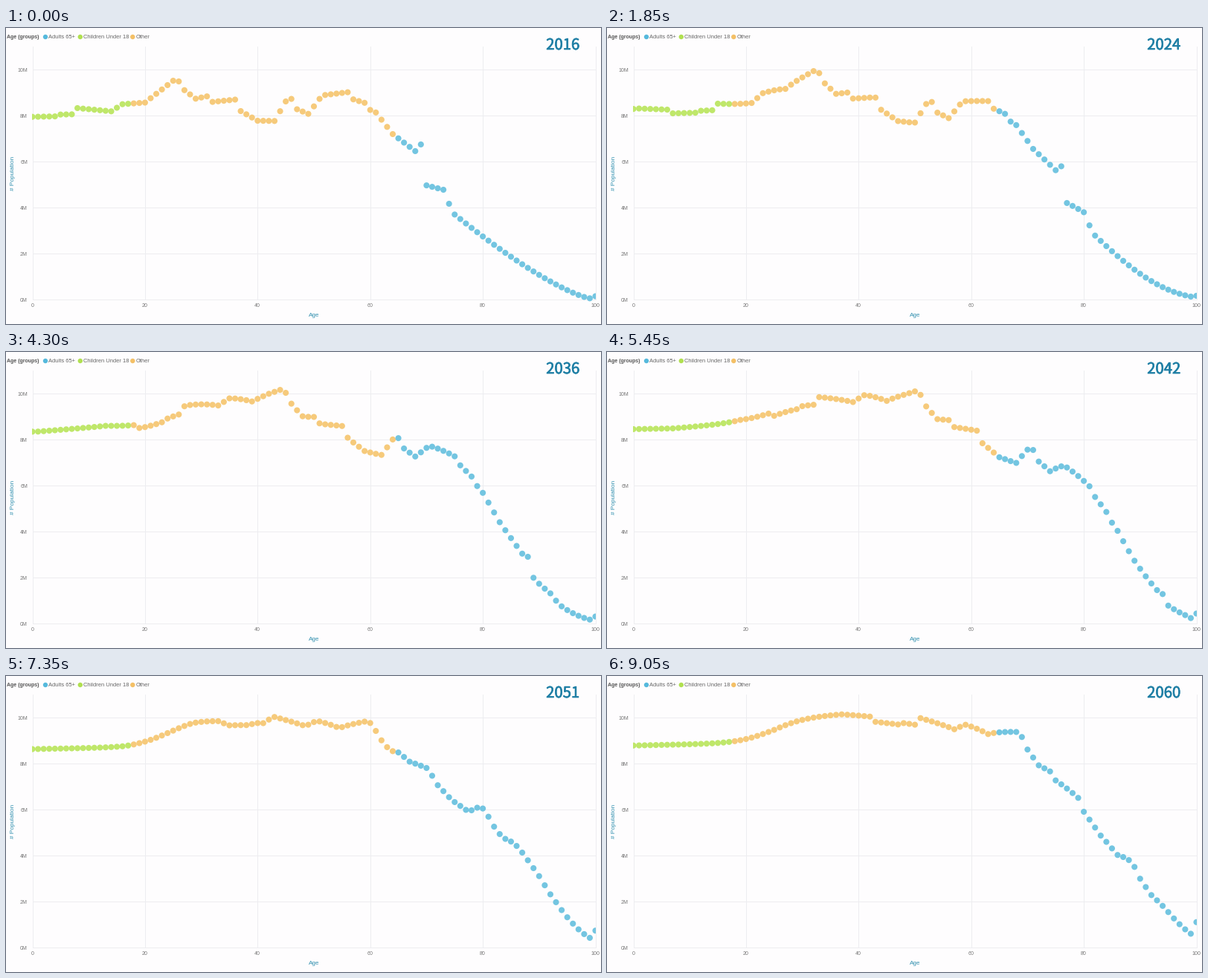
Animation of 800 by 399 pixels, one loop 9.1 s. Source, as a matplotlib script:

```python
import numpy as np
import matplotlib.pyplot as plt
from matplotlib.animation import FuncAnimation
from matplotlib.patches import Circle, Rectangle
from matplotlib.patheffects import withStroke

W, H, DPI = 800, 399, 100
STEP_MS, FRAMES = 50, 182
FIRST_MS, YEAR_MS = 450, 200      # start of the first move, time per year
START_YEAR = 2016

LEFT, RIGHT, TOP, BASE = 35.5, 793, 25, 366.2
PX_PER_AGE, PX_PER_M = 7.57, 31
BLUE, GREEN, ORANGE = "#73c5e1", "#bfe76a", "#f6ca7b"
TEAL, GREY, GRID = "#2f8fae", "#777777", "#ededf0"

# Turning points of the first year's curve: (age, millions)
TURNS = [(0, 7.95), (4, 7.97), (5, 8.05), (7, 8.06), (8, 8.33), (14, 8.19),
         (16, 8.5), (20, 8.57), (25, 9.52), (26, 9.49), (27, 9.11), (29, 8.74),
         (31, 8.84), (32, 8.6), (36, 8.7), (37, 8.2), (40, 7.78), (43, 7.77),
         (45, 8.62), (46, 8.73), (47, 8.28), (49, 8.08), (51, 8.73), (52, 8.9),
         (56, 9.02), (57, 8.71), (59, 8.56), (60, 8.25), (61, 8.14), (64, 7.2),
         (68, 6.46), (69, 6.75), (70, 4.97), (73, 4.78), (74, 4.17)]
BIRTHS = [(1, 8.13), (6, 8.29), (18, 8.33), (43, 8.79)]

AGES = np.arange(101)


def through(x, points):
    return np.interp(x, *zip(*points))


def first_year(age):
    tail = .06 + .0585 * np.maximum(99 - age, 0) ** 1.3
    return np.where(age < 75, through(age, TURNS), tail)


def arrivals(age, n):
    """Growth of a birth cohort by migration, mostly in its twenties."""
    mid = 24.5 - 1.7 * np.exp(-n / 5)
    return 1 + .0027 * np.minimum(age, 42) + .13 / (1 + np.exp((mid - age) / 3))


def deaths(age, n):
    """Summed mortality: Gompertz law plus a midlife part, both easing with time."""
    late = 1.12 * np.exp(.108 * (age - 88.5))
    midlife = .0013 * np.clip(age - 50, 0, 22)
    return late * (1 - .005 * n) + midlife * (1 - .03 * n)


def population(n):
    """Millions by age, n years after the start."""
    born = AGES - n
    since = np.maximum(born, 0)
    people = np.where(born >= 0, first_year(since), through(-born, BIRTHS))
    people = people * arrivals(AGES, n) / arrivals(since, 0)
    people *= np.exp(deaths(since, n) - deaths(AGES, n))
    people[100] = .15 + .96 * (n / 43) ** 2.2      # everyone of 100 or more
    return people


def ease(u):
    return 4 * u ** 3 if u < .5 else 1 - 4 * (1 - u) ** 3


def state(ms):
    """Year shown and the population at a time."""
    if ms < FIRST_MS:
        return START_YEAR, population(0)
    done, rest = divmod(ms - FIRST_MS, YEAR_MS)
    u = ease(rest / YEAR_MS)
    people = (1 - u) * population(done) + u * population(done + 1)
    return START_YEAR + done + 1, people


fig = plt.figure(figsize=(W / DPI, H / DPI), dpi=DPI, facecolor="#fefdfe")
ax = fig.add_axes([0, 0, 1, 1])
ax.set_xlim(0, W)
ax.set_ylim(H, 0)
ax.axis("off")


def label(x, y, text, px, color=GREY, **kw):
    kw = {"ha": "left", "va": "center_baseline", "family": "Liberation Sans", **kw}
    return ax.text(x, y, text, fontsize=px * 72 / DPI, color=color, **kw)


def grid_line(xs, ys):
    ax.plot(xs, ys, color=GRID, lw=.72, zorder=1)


for age in range(0, 101, 20):
    x = LEFT + age * PX_PER_AGE
    grid_line([x, x], [TOP, BASE])
    label(x, 373.5, str(age), 7.2, ha="center")
for millions in range(0, 11, 2):
    y = BASE - millions * PX_PER_M
    grid_line([LEFT, RIGHT], [y, y])
    label(29, y, f"{millions}M", 7, ha="right")

label(414, 386.5, "Age", 8.2, TEAL, ha="center")
label(10, 195.5, "# Population", 8.3, TEAL, ha="center", va="center", rotation=90)

label(1, 12, "Age (groups)", 6.95, "#555555", weight="bold")
for x, color, name in [(53, "#55b9dc", "Adults 65+"),
                       (99.8, "#b0e050", "Children Under 18"),
                       (170.3, "#f4c066", "Other")]:
    ax.add_patch(Circle((x, 12), 3.2, color=color, lw=0))
    label(x + 4, 12, name, 7.45, "#666666")

YEAR_COLOR = "#1f7fa5"
year_text = label(748.7, 29, "", 20.3, YEAR_COLOR, ha="center", va="baseline",
                  family="Noto Sans CJK JP")
year_text.set_path_effects([withStroke(linewidth=.5, foreground=YEAR_COLOR)])

colors = [GREEN if a < 18 else ORANGE if a < 65 else BLUE for a in AGES]
xs = LEFT + AGES * PX_PER_AGE
dots = ax.scatter(xs, np.full(101, BASE), s=34, c=colors, linewidths=0, zorder=3)
dots.set_clip_path(Rectangle((LEFT - .5, 0), RIGHT - LEFT + .5, BASE + 5,
                             transform=ax.transData))


def draw(i):
    year, people = state(i * STEP_MS)
    year_text.set_text(str(year))
    dots.set_offsets(np.column_stack([xs, BASE - people * PX_PER_M]))
    return dots, year_text


anim = FuncAnimation(fig, draw, frames=FRAMES, interval=STEP_MS,
                     repeat=True, repeat_delay=0)
plt.show()
```
